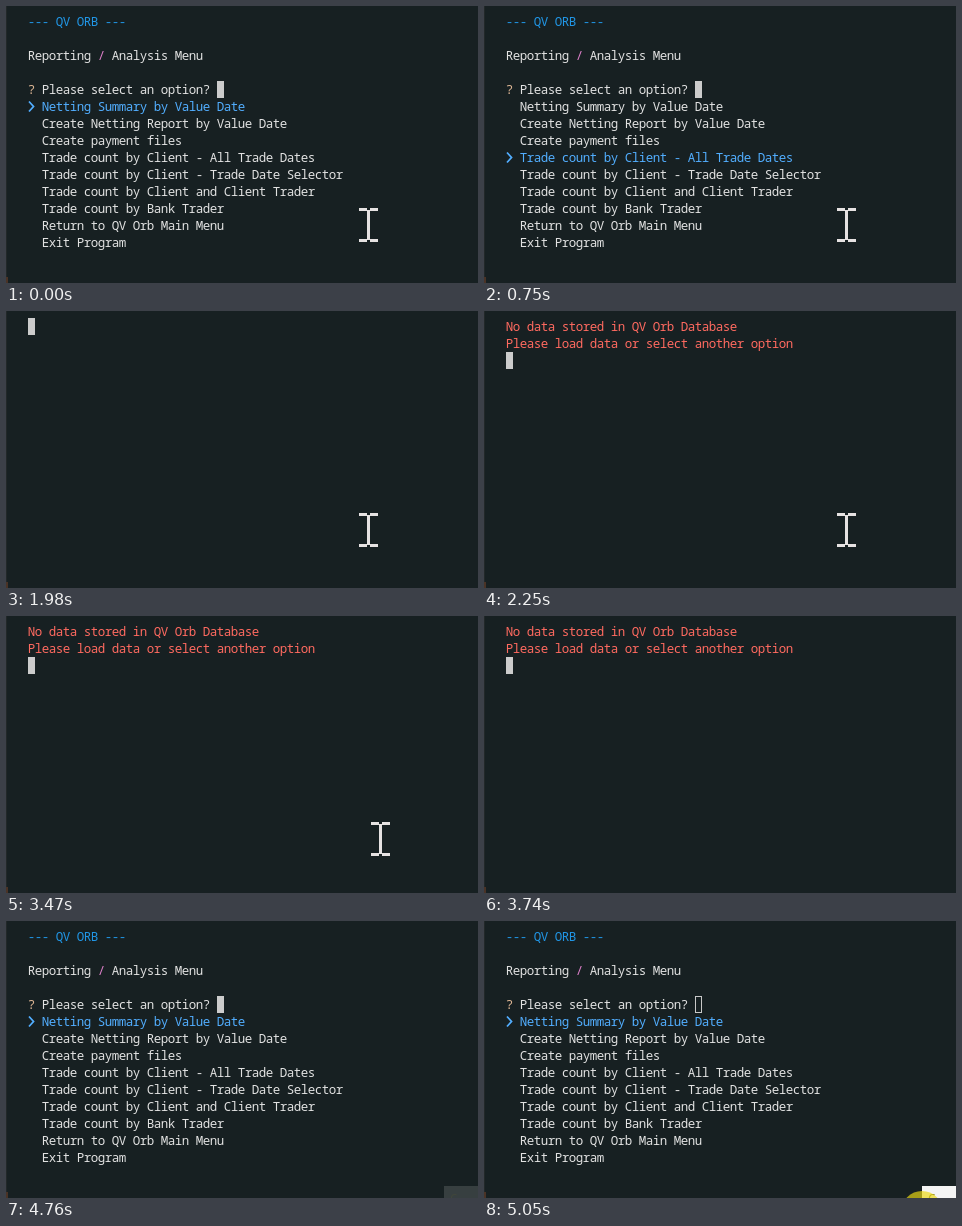
An HTML page with a canvas that plays this animation: 472x277 px, repeating every 5.08 s.

```html
<!DOCTYPE html>
<html lang="en">
<head>
<meta charset="utf-8">
<title>Terminal menu</title>
<style>
html, body { margin: 0; width: 100%; height: 100%; overflow: hidden; background: #172022; }
canvas { display: block; }
</style>
</head>
<body>
<canvas id="stage" width="472" height="277"></canvas>
<script>
const g = document.getElementById('stage').getContext('2d');
const LOOP = 5080, LEFT = 22, TOP = 7, CELL = 7, ROW = 17;
const WHITE = '#e2e2e2', BLUE = '#52aeff', RED = '#ff6a60';
const OPTIONS = [
  'Netting Summary by Value Date',
  'Create Netting Report by Value Date',
  'Create payment files',
  'Trade count by Client - All Trade Dates',
  'Trade count by Client - Trade Date Selector',
  'Trade count by Client and Client Trader',
  'Trade count by Bank Trader',
  'Return to QV Orb Main Menu',
  'Exit Program'
];
const KEY_TIMES = [400, 570, 750, 890, 1040, 1230];

const clamp = v => Math.max(0, Math.min(1, v));

function box(x, y, w, h, color) {
  g.fillStyle = color;
  g.fillRect(x, y, w, h);
}

// Terminal text: one character centred in each cell
function print(row, col, text, color) {
  g.fillStyle = color;
  g.textAlign = 'center';
  [...text].forEach((ch, i) =>
    g.fillText(ch, LEFT + (col + i + .5) * CELL, TOP + row * ROW + 13));
}

function caret(row, col, hollow) {
  const x = LEFT + col * CELL, y = TOP + row * ROW;
  if (hollow) {
    g.strokeStyle = '#c8c8c8';
    g.lineWidth = 1;
    g.strokeRect(x + .5, y + .5, CELL - 1, ROW - 1);
  } else box(x, y, CELL, ROW, '#cccccc');
}

function pointer(row) {
  const x = LEFT + 1, y = TOP + row * ROW + 8.5;
  g.strokeStyle = BLUE;
  g.lineWidth = 1.8;
  g.beginPath();
  g.moveTo(x, y - 5);
  g.lineTo(x + 4.5, y);
  g.lineTo(x, y + 5);
  g.stroke();
}

function menu(selected, hollow) {
  print(0, 0, '--- QV ORB ---', '#2196e6');
  print(2, 0, 'Reporting   Analysis Menu', WHITE);
  print(2, 10, '/', '#e080cc');
  print(4, 0, '?', '#dfb795');
  print(4, 2, 'Please select an option?', WHITE);
  caret(4, 27, hollow);
  OPTIONS.forEach((text, i) => print(5 + i, 2, text, i === selected ? BLUE : WHITE));
  pointer(5 + selected);
}

function notice() {
  print(0, 0, 'No data stored in QV Orb Database', RED);
  print(1, 0, 'Please load data or select another option', RED);
  caret(2, 0);
}

function mouse(t) {
  if (t >= 3740) return;
  const p = t < 3470 ? 0 : (Math.floor((t - 3470) / 20.8) + 1) / 14;
  const x = Math.round(353 + 85 * (1 - (1 - p) ** 2));
  const y = Math.round(202 + 75 * p ** 1.1);
  const color = '#e6e2e2';
  for (const dy of [0, 31]) {
    box(x, y + dy, 8, 3, color);
    box(x + 11, y + dy, 8, 3, color);
  }
  box(x + 8, y + 2, 3, 30, color);
}

function popup(t) {
  if (t < 4760) return;
  g.globalAlpha = .14 + .86 * clamp((t - 4770) / 200);
  box(438, 265, 34, 12, '#f4f4f4');
  g.fillStyle = '#77701c';
  g.textAlign = 'left';
  g.fillText('C', 444, 282);
  g.globalAlpha = 1;
  const rise = clamp((t - 4850) / 200);
  if (!rise) return;
  g.fillStyle = 'rgba(238, 218, 20, .68)';
  g.beginPath();
  g.arc(438, 313 - 22 * rise, 21, 0, 7);
  g.fill();
}

function draw(t) {
  box(0, 0, 472, 277, '#172022');
  box(0, 0, 1, 277, '#222829');
  box(0, 271, 2, 6, '#4a3326');
  g.font = '500 12.5px "Noto Sans Mono", "DejaVu Sans Mono", monospace';
  if (t < 1980) menu(KEY_TIMES.filter(k => t >= k).length, false);
  else if (t < 2250) caret(0, 0);
  else if (t < 4120) notice();
  else menu(0, t >= 4820);
  mouse(t);
  popup(t);
}

function tick() {
  draw(performance.now() % LOOP);
  requestAnimationFrame(tick);
}
tick();
</script>
</body>
</html>
```
